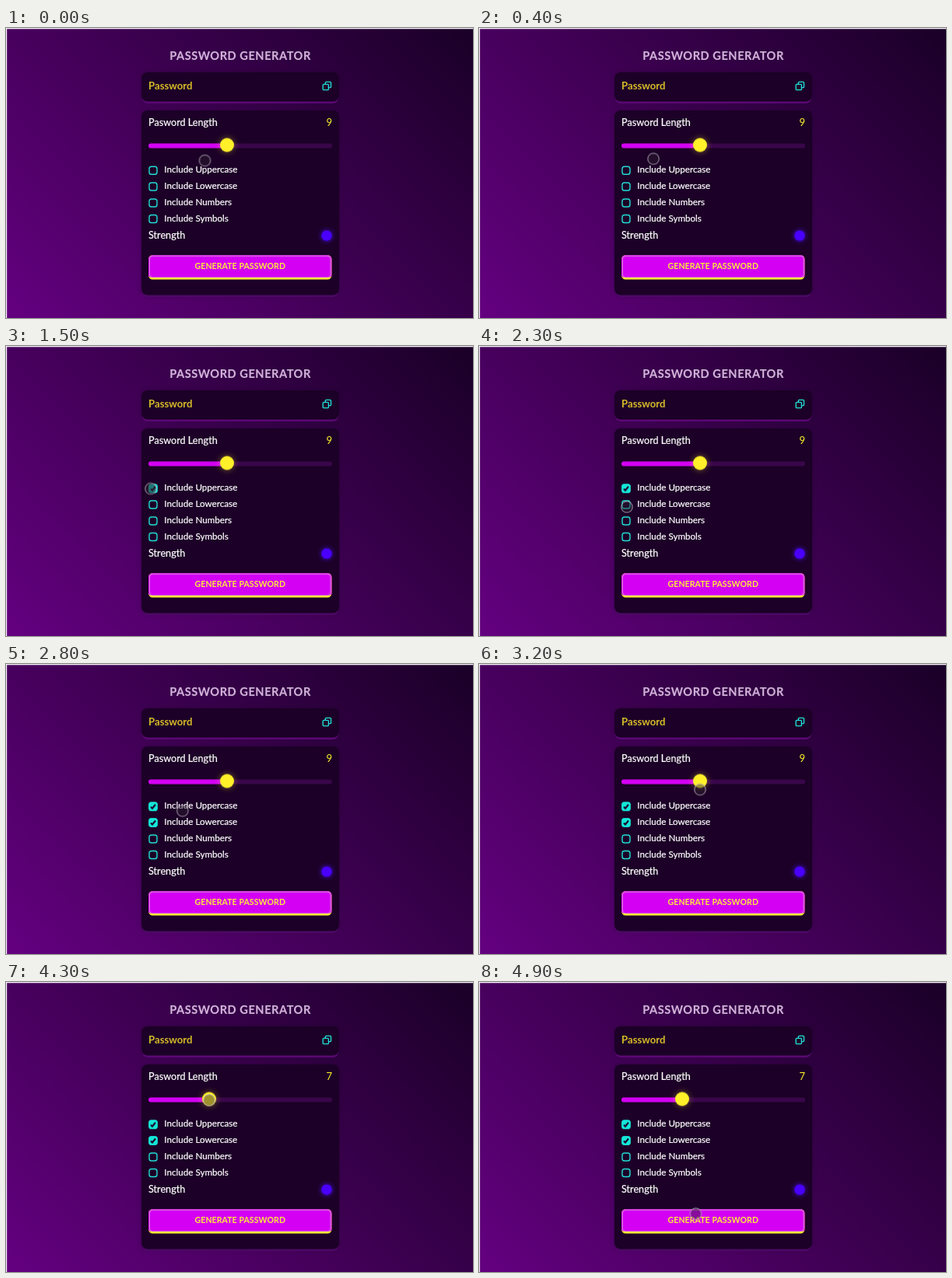
Write an HTML page that moves like this. It is 600 by 373 pixels and loops after 5000 ms.

```html
<!DOCTYPE html>
<html lang="en">
<head>
<meta charset="utf-8">
<title>Password generator</title>
<style>
  html, body { margin: 0; width: 100%; height: 100%; overflow: hidden; background: #1b0028; }
  svg { display: block; width: 100vw; height: 100vh; font-family: Lato, "Open Sans", sans-serif; }
  .bold { font-weight: 700; }
  .label, .head { fill: #fff; stroke: #fff; stroke-width: .22px; }
  .label { font-size: 11.65px; }
  .head { font-size: 12.65px; }
  .count { font-size: 13px; fill: #fff02a; text-anchor: end; }
  .glow { filter: drop-shadow(0 0 4px #ffee2a66); }
  .lamp { filter: drop-shadow(0 0 3px #4a10ff); }
  .panel { fill: #1c0027; filter: drop-shadow(0 0 3px #1c002766); }
  .lip { filter: blur(.6px); }

  .cursor, .ring, .knob, .fill, .tick, .count, .press { animation: 5s step-end infinite; }
  .cursor { animation-name: roam; }
  .ring { animation-name: squeeze; }
  .knob { animation-name: slide; }
  .fill { animation-name: shrink; }
  .press { animation-name: press; }
  .upper { animation-name: upper; }
  .lower { animation-name: lower; }
  .nine { animation-name: nine; }
  .eight { animation-name: eight; }
  .seven { animation-name: seven; }

  @keyframes roam {
    0% { transform: translate(255.5px, 170.5px); animation-timing-function: steps(7); }
    14% { transform: translate(200.5px, 166.5px); animation-timing-function: steps(5); }
    24% { transform: translate(187px, 182px); animation-timing-function: steps(3); }
    30% { transform: translate(186px, 183.5px); animation-timing-function: steps(3); }
    36% { transform: translate(187px, 185px); animation-timing-function: steps(3); }
    42% { transform: translate(190px, 206px); animation-timing-function: steps(2); }
    46% { transform: translate(190px, 207px); animation-timing-function: steps(3); }
    52% { transform: translate(190px, 206px); animation-timing-function: steps(5); }
    62% { transform: translate(282px, 163px); animation-timing-function: steps(1); }
    64% { transform: translate(284px, 161.5px); animation-timing-function: steps(2); }
    68% { transform: translate(283px, 152px); animation-timing-function: steps(3); }
    74% { transform: translate(272px, 152px); animation-timing-function: steps(3); }
    80% { transform: translate(262px, 152px); animation-timing-function: steps(3); }
    86% { transform: translate(261px, 152px); animation-timing-function: steps(3); }
    92% { transform: translate(262px, 164px); animation-timing-function: steps(2); }
    96% { transform: translate(271px, 256px); animation-timing-function: steps(1); }
    98%, 100% { transform: translate(278.5px, 298px); }
  }
  @keyframes squeeze {
    0% { transform: none; }
    70% { transform: scale(.86); }
    86%, 100% { transform: none; }
  }
  @keyframes slide {
    0% { transform: translate(284px, 150.5px); }
    74% { transform: translate(272px, 150.5px); }
    80%, 100% { transform: translate(261px, 150.5px); }
  }
  @keyframes shrink {
    0% { width: 101px; }
    74% { width: 89px; }
    80%, 100% { width: 78px; }
  }
  @keyframes press {
    0% { opacity: 0; }
    30% { opacity: .25; }
    32% { opacity: 0; }
    50% { opacity: .25; }
    52% { opacity: 0; }
    70% { opacity: .2; }
    86%, 100% { opacity: 0; }
  }
  @keyframes upper { 0% { opacity: 0; } 30%, 100% { opacity: 1; } }
  @keyframes lower { 0% { opacity: 0; } 50%, 100% { opacity: 1; } }
  @keyframes nine { 0% { opacity: 1; } 74%, 100% { opacity: 0; } }
  @keyframes eight { 0% { opacity: 0; } 74% { opacity: 1; } 80%, 100% { opacity: 0; } }
  @keyframes seven { 0% { opacity: 0; } 80%, 100% { opacity: 1; } }
</style>
</head>
<body>
<svg viewBox="0 0 600 373" preserveAspectRatio="none">
  <defs>
    <linearGradient id="bg" gradientUnits="userSpaceOnUse" x1="56.75" y1="429.75" x2="543.25" y2="-56.75">
      <stop offset="0" stop-color="#640080"/>
      <stop offset="1" stop-color="#1a0027"/>
    </linearGradient>
    <rect id="box" x="-5" y="-5" width="10" height="10" rx="2.8" fill="none" stroke="#22dcd6" stroke-width="1.4"/>
    <g id="checked">
      <rect x="-5.7" y="-5.7" width="11.4" height="11.4" rx="3" fill="#14e6d8"/>
      <path d="M-3 .5 -1 2.5 3 -2.5" fill="none" stroke="#1c0027" stroke-width="2.1"/>
    </g>
  </defs>

  <rect width="600" height="373" fill="url(#bg)"/>
  <path d="M0 .6H600M.6 0V373" stroke="#f6f2f6" stroke-width="1.2"/>

  <text class="bold" x="301" y="41.3" text-anchor="middle" font-size="14.6" letter-spacing=".54" fill="#d2b3da" stroke="#d2b3da" stroke-width=".15">PASSWORD GENERATOR</text>

  <rect class="lip" x="174.5" y="62" width="253" height="35" rx="8" fill="#640a80"/>
  <rect class="panel" x="174" y="57" width="254" height="37.5" rx="8"/>
  <text class="bold" x="183" y="78.7" font-size="13.2" fill="#d6bb28">Password</text>
  <g fill="#1c0027" stroke="#22dcd6" stroke-width="1.4">
    <rect x="410.3" y="69.4" width="7.2" height="7.2" rx="1.2"/>
    <rect x="407.2" y="72.4" width="7.2" height="7.2" rx="1.2"/>
  </g>

  <rect class="lip" x="174.5" y="300" width="253" height="46" rx="8" fill="#560a70"/>
  <rect class="panel" x="174" y="106" width="254" height="237.5" rx="8"/>
  <text class="head" x="183" y="125.5">Pasword Length</text>
  <text class="count nine" x="419" y="126">9</text>
  <text class="count eight" x="419" y="126">8</text>
  <text class="count seven" x="419" y="126">7</text>

  <rect x="183" y="148.4" width="236" height="6" rx="3" fill="#39064a"/>
  <rect class="fill" x="183" y="148.4" width="101" height="6" rx="3" fill="#d200f2"/>
  <g class="knob"><circle class="glow" r="9" fill="#fff02a"/></g>

  <use href="#box" x="189" y="183.3"/>
  <use href="#box" x="189" y="204"/>
  <use href="#box" x="189" y="225"/>
  <use href="#box" x="189" y="245.5"/>
  <use class="tick upper" href="#checked" x="189" y="183.3"/>
  <use class="tick lower" href="#checked" x="189" y="204"/>
  <g class="label">
    <text x="203.3" y="186">Include Uppercase</text>
    <text x="203.3" y="207">Include Lowercase</text>
    <text x="203.3" y="228">Include Numbers</text>
    <text x="203.3" y="248.5">Include Symbols</text>
  </g>

  <text class="head" x="183" y="270.7">Strength</text>
  <circle class="lamp" cx="412" cy="267" r="6.6" fill="#4a00ff"/>

  <rect x="183" y="292" width="235.5" height="31.5" rx="5.5" fill="#ffec2e"/>
  <path d="M188.5 292H413A5.5 5.5 0 0 1 418.5 297.5V318Q418.5 321 413 321H188.5Q183 321 183 318V297.5A5.5 5.5 0 0 1 188.5 292Z" fill="#d400f4"/>
  <rect x="184.4" y="293.2" width="232.7" height="27.6" rx="4" fill="none" stroke="#d8a0c8" stroke-width=".9"/>
  <text class="bold" x="300.8" y="310.2" text-anchor="middle" font-size="10.5" letter-spacing=".1" fill="#ffe93a">GENERATE PASSWORD</text>

  <g class="cursor">
    <g class="ring">
      <circle r="7.2" fill="#2a2030" fill-opacity=".45" stroke="#b4aab8" stroke-opacity=".7" stroke-width="1.3"/>
      <circle class="press" r="6.6" fill="#303030"/>
    </g>
  </g>
</svg>
</body>
</html>
```
